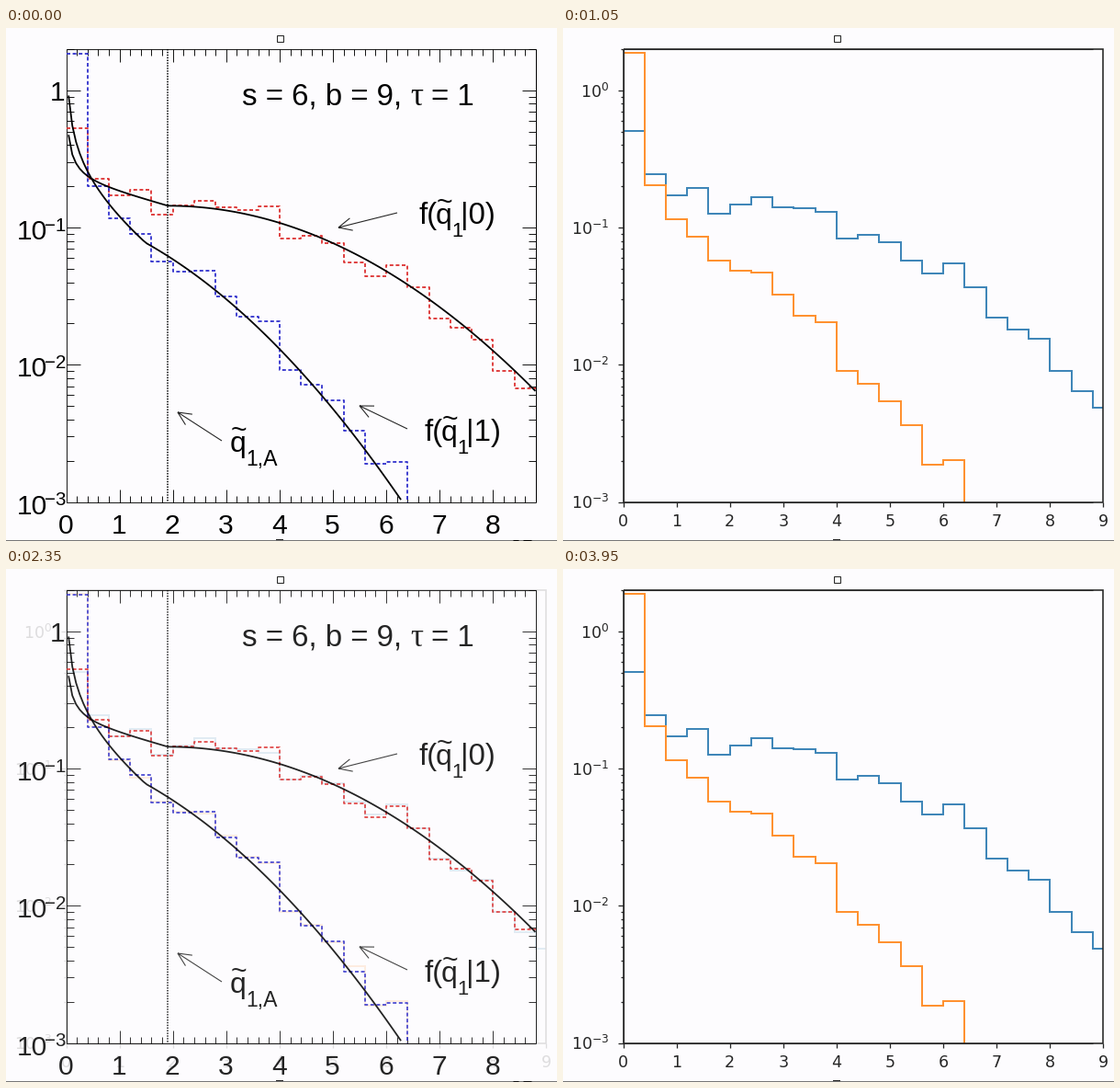
Recreate the animation shown at these times as a matplotlib script. Size 600 by 558 pixels, loop 4000 ms.

```python
import math
import numpy as np
import matplotlib.pyplot as plt
from matplotlib.animation import FuncAnimation
from matplotlib.patches import Rectangle

W, H, FRAMES, STEP = 600, 558, 80, 50
PAPER, INK, SOFT = "#fdfcfe", "#000000", "#262626"
X0, Y0, UNIT, DECADE = 65.5, 68, 58.1, 149.2
LEFT, TOP, BOTTOM = 65.5, 22.5, 515.5
Q_OLD, Q_NEW, BIN = 8.8, 9, 0.4

plt.rcParams["lines.scale_dashes"] = False
fig = plt.figure(figsize=(W / 72, H / 72), dpi=72, facecolor=PAPER)
ax = fig.add_axes([0, 0, 1, 1])
ax.set(xlim=(0, W), ylim=(H, 0))
ax.axis("off")
rng = np.random.default_rng(3)

old = []    # artists of the layer that fades


def px(q):
    return X0 + UNIT * q


def py(f):
    return Y0 - DECADE * np.log10(f)


def line(xs, ys, color, width, z, **kw):
    kw.setdefault("solid_capstyle", "butt")
    art, = ax.plot(xs, ys, color=color, lw=width, zorder=z,
                   solid_joinstyle="miter", **kw)
    if z >= 5:
        old.append(art)


def segments(parts, color, width, z):
    rows = np.array([(*p, np.nan, np.nan) for p in parts], float)
    xy = rows.reshape(-1, 2)
    line(xy[:, 0], xy[:, 1], color, width, z)


def label(x, y, s, size, z=6, color=INK, font="Liberation Sans", **kw):
    art = ax.text(x, y, s, fontsize=size, color=color, family=font,
                  zorder=z, va="baseline", **kw)
    if z >= 5:
        old.append(art)


class Test:
    """Asymptotic distribution of the statistic q for signal strength mu."""

    def __init__(self, mu, r):
        self.mu, self.r, self.root = mu, r, math.sqrt(r)

    def z(self, q):
        if q < self.r:
            return math.sqrt(q) - (1 - self.mu) * self.root
        return (q - self.r * (1 - 2 * self.mu)) / (2 * self.root)

    def pdf(self, q):
        slope = 0.5 / math.sqrt(min(q, self.r))
        return slope * math.exp(-self.z(q) ** 2 / 2) / math.sqrt(2 * math.pi)

    def cdf(self, q):
        return (1 + math.erf(self.z(q) / math.sqrt(2))) / 2 if q > 0 else 0

    def levels(self, wobble):
        edges = BIN * np.arange(len(wobble) + 1)
        mass = np.diff([self.cdf(q) for q in edges])
        return py(mass / BIN) + wobble


def stairs(levels, q_max, color, width, z, **kw):
    edges = px(np.minimum(BIN * np.arange(len(levels) + 1), q_max))
    xs, ys = np.repeat(edges, 2)[1:-1], np.repeat(levels, 2)
    if edges[-1] < px(q_max):
        xs, ys = np.append(xs, xs[-1]), np.append(ys, BOTTOM)
    line(xs, ys, color, width, z, **kw)


def curve(test):
    qs = np.arange(0.045, Q_OLD + 0.05, 0.07)
    xs, ys = px(qs), py([test.pdf(q) for q in qs])
    keep = (ys < BOTTOM + 2) & (xs <= px(Q_OLD) + 1)
    line(xs[keep], ys[keep], INK, 1.8, 6)


def log_ticks():
    for k in range(-3, 1):
        for m in range(1, 10):
            y = py(m * 10.0 ** k)
            if TOP < y < BOTTOM - 1:
                yield y, m == 1


def arrow(tail, tip):
    ang = math.atan2(tail[1] - tip[1], tail[0] - tip[0])
    barbs = [(tip[0] + 16 * math.cos(ang + d), tip[1] + 16 * math.sin(ang + d))
             for d in (-0.44, 0.44)]
    segments([(*tip, *p) for p in [tail] + barbs], SOFT, 1.1, 6)


def q_tilde(x, y):
    label(x, y, "q", 32)
    label(x + 9, y - 15.5, "~", 30, ha="center")


def density(x, y, mu):
    label(x, y, "f(", 33)
    q_tilde(x + 19, y)
    label(x + 36, y + 14, "1", 22)
    label(x + 46, y, f"|{mu})", 33)


null, signal = Test(0, 1.907), Test(1, 1.49)

# Bin fluctuations in pixels; the reproduction differs by a little noise
null_wobble = np.array([4, -3, 5, -9, 12, -1, -7, -3, -5, -15, 13, 2,
                        0, 10, 12, -14, -5, 13, 5, -2, 12, 9, 6])
signal_wobble = np.array([0, -2, 3, -4, 10, 6, -12, -3, -1, -18, 11, 1,
                          -9, -5, 0, -34])


def again(wobble):
    return wobble + rng.normal(-0.5, 2, len(wobble))


# Lower layer: the reproduced histogram
right = px(Q_NEW)
line([LEFT, right, right, LEFT, LEFT], [TOP, TOP, BOTTOM, BOTTOM, TOP],
     SOFT, 1.6, 3)
stairs(null.levels(again(null_wobble)), Q_NEW, "#3f86b8", 2, 2)
stairs(signal.levels(again(signal_wobble)), Q_NEW, "#ff9130", 2, 2)
segments([(LEFT, y, LEFT - (5.5 if big else 3), y) for y, big in log_ticks()]
         + [(LEFT, BOTTOM, LEFT - 5.5, BOTTOM)]
         + [(px(i), BOTTOM, px(i), BOTTOM + 5.5) for i in range(10)],
         SOFT, 1.3, 3)
for i in range(10):
    label(px(i), 542, str(i), 17.5, 3, SOFT, "DejaVu Sans", ha="center")
for k in range(-3, 1):
    label(50.5, Y0 - DECADE * k + 7.5, rf"$\mathdefault{{10^{{{k}}}}}$", 17.5,
          3, SOFT, "DejaVu Sans", ha="right")

# Veil that hides the lower layer as the upper one appears
veil = ax.add_patch(Rectangle((0, 0), W, H, fc=PAPER, ec="none", zorder=4))

# Upper layer: the published plot
right = px(Q_OLD)
line([right, right], [TOP, BOTTOM], INK, 1, 5)
ticks = []
for y, big in log_ticks():
    n = 15 if big else 8
    ticks += [(LEFT, y, LEFT + n, y), (right, y, right - n, y)]
for i in range(1, 44):
    x, n = px(i / 5), 7 if i % 5 else 14
    ticks += [(x, BOTTOM, x, BOTTOM - n), (x, TOP, x, TOP + n)]
segments(ticks, INK, 0.9, 5)

dash = (0, (4, 2.6))
stairs(null.levels(null_wobble[:-1]), Q_OLD, "#dc3030", 1.8, 5, ls=dash)
stairs(signal.levels(signal_wobble), Q_OLD, "#3030cc", 1.8, 5, ls=dash)
curve(null)
curve(signal)
line([px(null.r)] * 2, [TOP, BOTTOM], INK, 1.6, 5, ls=(0, (1.4, 1.5)))

label(257, 84, "s = 6, b = 9,", 33)
label(440, 84, "τ", 35, font="Liberation Serif")
label(510, 84, "= 1", 33, ha="right")
density(449, 213, 0)
density(455, 449, 1)
q_tilde(244, 461)
label(261, 476, "1,A", 23)
arrow((426, 201), (362, 217))
arrow((437, 436), (385, 411))
arrow((235, 449), (187, 418))
for i in range(9):
    label(px(i) - 0.5, 550, str(i), 30, ha="center")
label(64, 79, "1", 30, ha="right")
for k in (1, 2, 3):
    y = Y0 + DECADE * k
    label(45.5, y + 13, "10", 30, ha="right")
    label(65, y + 3.5, f"−{k}", 20.5, ha="right")
segments([(552, 556.5, 558, 556.5), (563, 556.5, 572, 556.5)], INK, 1, 6)

# Fixed parts: shared frame edges, bottom rule and handles
line([right, LEFT, LEFT, right], [TOP, TOP, BOTTOM, BOTTOM], SOFT, 1.1, 4.5)
ax.add_patch(Rectangle((0, 557), W, 1, fc="#777777", ec="none", zorder=4.5))
ax.add_patch(Rectangle((294, 556), 8, 1, fc=SOFT, ec="none", zorder=4.5))
ax.add_patch(Rectangle((294.5, 7.5), 7, 7, fc="white", ec=SOFT, lw=1,
                       zorder=4.5))


def ramp(t, start, end):
    return min(max((t - start) / (end - start), 0), 1)


def opacity(t):
    return (1 - ramp(t, 550, 1030) + ramp(t, 1750, 2450)
            - ramp(t, 2850, 3950))


def draw(i):
    a = min(max(opacity(i * STEP), 0), 1)
    veil.set_alpha(a)
    for art in old:
        art.set_alpha(a)
    return [veil, *old]


anim = FuncAnimation(fig, draw, frames=FRAMES, interval=STEP, repeat=True,
                     init_func=lambda: draw(0))
plt.show()
```
